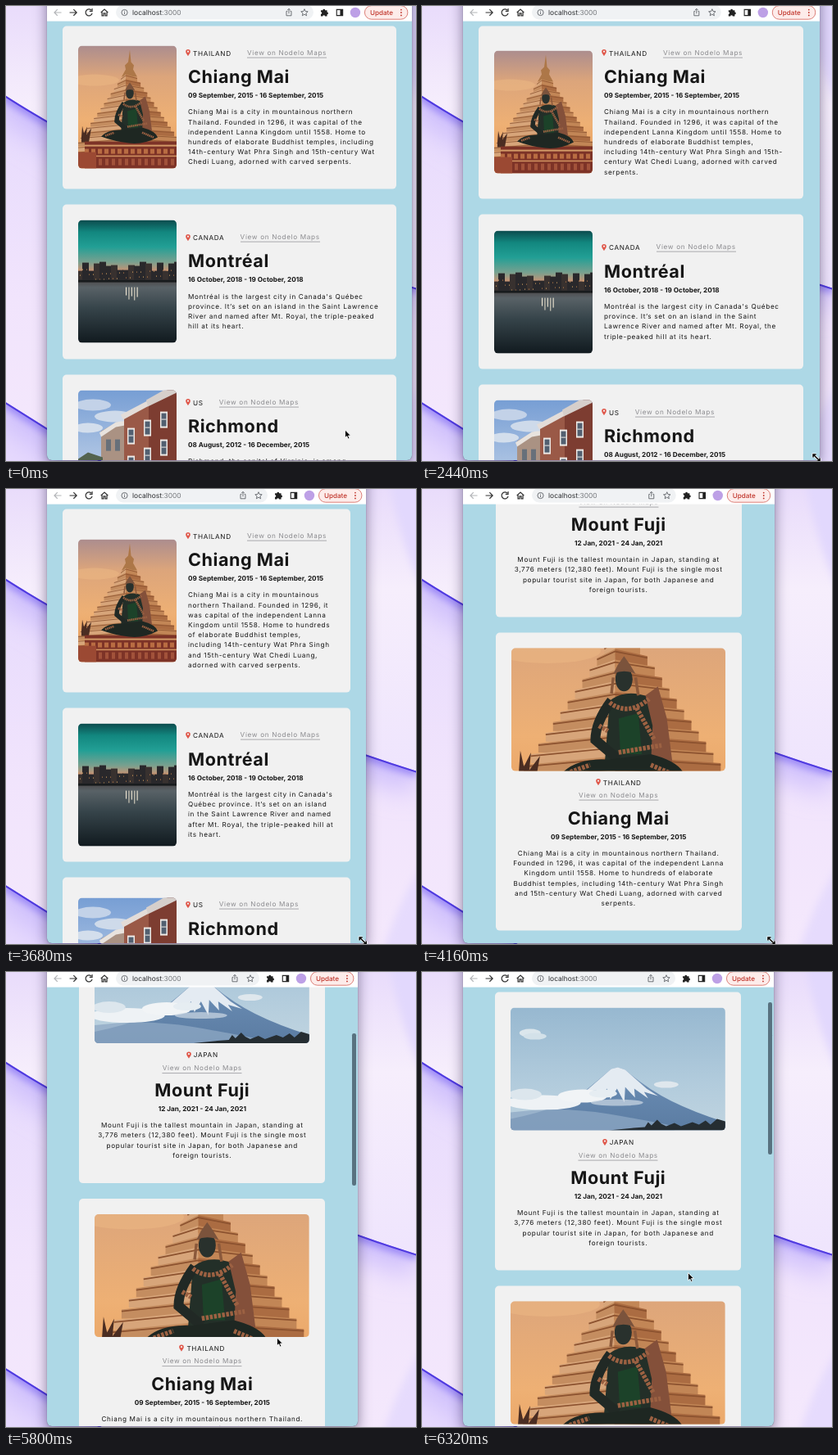
Write an HTML page that moves like this. It is 500 px wide and 556 px high and loops after 6.36 s.

```html
<!DOCTYPE html>
<html lang="en">
<head>
<meta charset="utf-8">
<title>Travel journal</title>
<style>
html, body { margin: 0; width: 100%; height: 100%; overflow: hidden; }
body { position: relative; font-family: Inter, Roboto, sans-serif; text-rendering: geometricPrecision; }
svg { display: block; }
.layer { position: absolute; left: 0; top: 0; width: 500px; height: 556px; }
#win { position: absolute; left: 49.6px; top: -30px; height: 584.8px; overflow: hidden;
  background: #add8e6; border-radius: 0 0 6px 6px;
  box-shadow: 0 6px 16px rgba(25, 15, 60, .5), 0 0 1px rgba(0, 0, 0, .6); }
#bar { position: absolute; left: -49.6px; top: 30px; width: 500px; height: 18.6px; }
#page { position: absolute; left: 0; right: 0; top: 30px; padding-top: 72px; }
.card { display: flex; align-items: center; margin: 0 19.4px 19.2px 19.2px; padding: 19.2px;
  background: #f1f1f1; border-radius: 5px; }
.card:first-child { box-sizing: border-box; height: 188.4px; overflow: hidden; }
.photo { flex: none; width: 120px; height: 150px; border-radius: 5px; }
.info { position: relative; flex: 1; margin: 0 -1.2px 0 14px; padding: 79.5px 0 8.2px;
  font-size: 8.16px; color: #161616; }
.loc { position: absolute; left: -3px; top: 8px; display: flex; line-height: 12px;
  letter-spacing: .67px; white-space: nowrap; }
.loc svg { width: 6px; height: 9px; margin: 1.5px 3px 0 0; }
.loc a { margin-left: 19.2px; line-height: 11px; color: #8b8b8f; border-bottom: 1px solid #a9a9ad; }
h2, .date { position: absolute; left: 0; right: 0; margin: 0; font-weight: 700; white-space: nowrap; }
h2 { top: 30.2px; font-size: 21.6px; line-height: 26px; letter-spacing: .55px; }
.date { top: 59.2px; line-height: 12px; }
p { margin: 0; line-height: 12.24px; letter-spacing: .67px; }
.col .card { flex-direction: column; box-sizing: border-box; width: 300px; height: auto; margin: 0 auto 19.2px; }
.col .photo { width: 261.6px; }
.col .info { flex: none; width: 261.6px; margin: 0; padding-top: 94px; text-align: center; }
.col .loc { left: 0; right: 0; justify-content: center; }
.col .loc a { position: absolute; left: 50%; top: 16.5px; margin: 0; transform: translateX(-50%); }
.col h2 { top: 44.7px; }
.col .date { top: 73.7px; }
#thumb { position: absolute; right: 2.2px; top: 50px; width: 4.4px; height: 186px; border-radius: 2.2px; background: #587280; }
</style>
</head>
<body>
<svg class="layer" id="wall" viewBox="0 0 500 556"></svg>
<div id="win">
  <div id="page"></div>
  <div id="thumb"></div>
  <svg id="bar" viewBox="0 0 500 18.6">
    <rect width="500" height="18.6" fill="#fff"/>
    <g fill="none" stroke="#333" stroke-width="1.2">
      <path d="M67.5 8H59M62.7 4.2L58.9 8l3.8 3.8" stroke="#b3b5b8"/>
      <path d="M77.5 8H86M82.3 4.2L86.1 8l-3.8 3.8"/>
      <path d="M104 5.2A4 4 0 1 0 105 8.8M105 3v3.3h-3.3"/>
      <path d="M115.7 8L120 4l4.3 4M117 7.3v4.6h2v-3h2v3h2V7.3"/>
    </g>
    <rect id="omni" x="134" y="-1" height="17.4" rx="8.7" fill="#f0f2f4"/>
    <g fill="none" stroke="#5f6368" stroke-width=".9">
      <circle cx="144.5" cy="8" r="3.6"/><path d="M144.5 7.4v2.6M144.5 5.7v.9"/>
    </g>
    <text x="154" y="11.1" font-size="8.45" fill="#2b2d30">localhost<tspan fill="#74777b">:3000</tspan></text>
    <g id="tools">
      <g fill="none" stroke="#5f6368" stroke-width=".9">
        <path d="M343.3 6.4h-1.3v5.4h6V6.4h-1.3M345 9.3V3.4M343.2 5.1L345 3.3l1.8 1.8"/>
        <path d="M364 3.7l1.2 2.8 3 .3-2.3 2 .7 3-2.6-1.6-2.6 1.6.7-3-2.3-2 3-.3z"/>
      </g>
      <path d="M384 5.2h2.4a1.4 1.4 0 1 1 2.8 0h2.4v2.3a1.4 1.4 0 1 1 0 2.8v2.3H389a1.3 1.3 0 0 0-2.6 0H384V9.9a1.3 1.3 0 0 0 0-2.6z" fill="#222"/>
      <path d="M403.3 4.4h7.4v7.2h-7.4z" fill="none" stroke="#222" stroke-width="1.1"/>
      <path d="M407.5 4.4h3.2v7.2h-3.2z" fill="#222"/>
      <circle cx="426" cy="8" r="6.2" fill="#bda0e6"/>
      <rect x="437.5" y="-.4" width="52.5" height="16.6" rx="8.3" fill="#fdecea" stroke="#d8726a" stroke-width=".9"/>
      <text x="444" y="11" font-size="8.1" font-weight="500" fill="#c0352b">Update</text>
      <g fill="#c0352b"><circle cx="482" cy="4.6" r=".9"/><circle cx="482" cy="8" r=".9"/><circle cx="482" cy="11.4" r=".9"/></g>
    </g>
  </svg>
</div>
<svg class="layer" viewBox="0 0 500 556">
  <g id="arrow"><path d="M0 0V9.6L2.2 7.6 3.7 11 5.4 10.2 3.9 7H6.9Z" fill="#000" stroke="#fff" stroke-width=".8"/></g>
  <g id="sizer">
    <path d="M-3 -3L3 3M-4 -.5V-4H-.5M4 .5V4H.5" fill="none" stroke="#fff" stroke-width="3"/>
    <path d="M-3 -3L3 3M-4 -.5V-4H-.5M4 .5V4H.5" fill="none" stroke="#000" stroke-width="1.5"/>
  </g>
  <g id="beam" fill="none">
    <path d="M-2 -4.6Q0 -4.6 0 -3.2 0 -4.6 2 -4.6M0 -3.2V3.2M-2 4.6Q0 4.6 0 3.2 0 4.6 2 4.6M-1.2 1.2H1.2" stroke="#fff" stroke-width="1.8"/>
    <path d="M-2 -4.6Q0 -4.6 0 -3.2 0 -4.6 2 -4.6M0 -3.2V3.2M-2 4.6Q0 4.6 0 3.2 0 4.6 2 4.6M-1.2 1.2H1.2" stroke="#222" stroke-width=".9"/>
  </g>
</svg>
<script>
const $ = id => document.getElementById(id);
const times = (n, f) => Array.from({ length: n }, (_, i) => f(i)).join('');
const grad = (id, ...stops) => `<linearGradient id="${id}" x2="0" y2="1">` +
  stops.map(([o, c]) => `<stop offset="${o}" stop-color="${c}"/>`).join('') + '</linearGradient>';
const box = (x, y, w, h, fill) => `<rect x="${x}" y="${y}" width="${w}" height="${h}" fill="${fill}"/>`;
const path = (d, fill, more = '') => `<path d="${d}" fill="${fill}" ${more}/>`;
const oval = (x, y, rx, ry, fill, more = '') => `<ellipse cx="${x}" cy="${y}" rx="${rx}" ry="${ry}" fill="${fill}" ${more}/>`;
const blur = (id, r) => `<filter id="${id}" filterUnits="userSpaceOnUse" x="-60" y="-60" width="620" height="680"><feGaussianBlur stdDeviation="${r}"/></filter>`;

// Wallpaper: overlapping sheets, each with a soft glow along its edge
const sheet = (id, edge, close, fill) => {
  const line = (c, w, f) => path(edge, 'none', `stroke="${c}" stroke-width="${w}" filter="url(#${f})"`);
  return `<clipPath id="${id}"><path d="${edge}${close}"/></clipPath><g clip-path="url(#${id})">` +
    path(edge + close, fill) + line('#cfc0fc', 56, 'wide') + line('#9a87f6', 13, 'mid') + line('#4f3ae0', 4, 'fine') + '</g>';
};
$('wall').innerHTML = blur('wide', 16) + blur('mid', 5) + blur('fine', .7) +
  grad('dusk', [0, '#e9dcfb'], [.22, '#f6eefc'], [.6, '#efe5fd'], [1, '#f6e9fc']) +
  grad('sheer', [0, '#e6dafd'], [.55, '#f1e4fc'], [1, '#f4e8fc']) +
  box(0, 0, 500, 556, 'url(#dusk)') +
  path('M466 -20Q478 66 520 150V-20Z', '#e2d8fd', 'filter="url(#mid)"') +
  sheet('s1', 'M-2 108.5Q60 149 200 222T502 345', 'V558H-2Z', 'url(#sheer)') +
  sheet('s2', 'M-2 483L60 522 120 558', 'H-2Z', '#e6d9fd') +
  path('M455 580Q478 500 520 440V580Z', '#e6dbfd', 'filter="url(#mid)"');

const fuji = grad('fs', [0, '#97b8d0'], [.6, '#b1cbdc'], [1, '#c0d4e0']) + grad('fm', [0, '#8ba6c4'], [.4, '#6587ae'], [1, '#5b7ca2']) +
  box(0, 0, 262, 150, 'url(#fs)') +
  oval(24, 31, 13, 5, '#dbe6ec') + oval(30, 35, 14, 4, '#d3e1e9') + oval(190, 94, 15, 4, '#dfe7ed') +
  path('M0 136Q70 122 98 96L123 75 131 73 140 76Q168 100 196 114T262 140V150H0Z', 'url(#fm)') +
  path('M92 102L123 75 131 73 140 76 166 99 180 108 163 103 168 111 151 99 152 110 140 97 139 116 130 99 122 112 118 99 106 110 107 101Z', '#e4ebf2') +
  oval(40, 116, 46, 9, '#eef2f5') + oval(88, 108, 30, 8, '#f1f4f6') + oval(113, 105, 17, 5, '#e6edf2') +
  oval(18, 106, 20, 7, '#dce6ed') + oval(130, 116, 32, 4, '#cfdbe6', 'opacity=".7"') +
  path('M0 128Q60 120 120 130T200 145V150H0Z', '#8ea9c4', 'opacity=".75"') +
  path('M120 150L150 147 164 146 168 140 172 144 179 137 184 142 190 145 200 141 208 145 222 140 230 143 238 138 244 143 252 136 262 139V150Z', '#252d32');

// The ridge of the stupa splits each tier into a lit and a shaded face
const tiers = times(17, i => {
  const y = 35 + i * 6, w = 10 + i * 4.1, a = 62 - w, b = 62 + w;
  return path(`M${a} ${y + 5}L58 ${y}V${y + 10}H${a}Z`, i % 2 ? '#c48d60' : '#d7a57a') +
    path(`M58 ${y}L${b} ${y + 4}V${y + 10}H58Z`, i % 2 ? '#ab6c42' : '#c28656') +
    path(`M${a} ${y + 6}L58 ${y + 1.4}L${b} ${y + 5}`, 'none', 'stroke="#8c522f" stroke-width=".8"');
});
const temple = grad('ts', [0, '#ac8d8e'], [.25, '#dca57b'], [.6, '#eeb074'], [1, '#e59a58']) +
  box(0, 0, 120, 150, 'url(#ts)') + oval(20, 42, 30, 7, '#f0bd88', 'opacity=".4"') +
  path('M63 5L64.5 20 68 24 67 29 72 38H53L58 29 57 24 61 20Z', '#ad7748') + tiers +
  path('M4 112L5 98 7 107 11 99 10 109 16 101 13 118H4Z', '#4b2d22') +
  box(8, 117, 112, 33, '#7d3327') +
  times(14, i => box(8 + i * 8, 126, 5, 6, '#b96c42') + box(9 + i * 8, 138, 4, 8, '#a2523a')) +
  box(8, 121, 112, 2, '#d39a68') + box(8, 134, 112, 1.6, '#cf9060') + box(0, 130, 22, 20, '#9b4933') +
  path('M55 70Q64 63 77 68L84 84 80 108H52Z', '#232f28') + path('M60 80L71 77 73 100H61Z', '#1c4229') +
  path('M75 67L82 62 87 80 90 104 78 106 79 84Z', '#84503a') +
  path('M56 70Q47 82 47 92L60 103', 'none', 'stroke="#212925" stroke-width="5.5"') +
  path('M28 111Q36 102 54 103L78 100Q94 104 97 112 80 121 62 119T28 111Z', '#1e2722') +
  path('M55 71Q65 79 77 69M49 84L54 87M60 99L84 95M70 74L80 92M33 110L44 106M78 106L92 112', 'none', 'stroke="#9c6142" stroke-width="2.6" stroke-dasharray="1.6 .7"') +
  oval(63, 58, 4.8, 6.8, '#29312d') + path('M57 55L59.5 50 63 45 66.5 50 69.5 55Q63 52 57 55Z', '#7b533c') +
  path('M57 57L56 66M69.5 57L71 67', 'none', 'stroke="#8b593b" stroke-width="1.6"');

const roofs = times(18, i => {
  const h = 9 + (i * 7 + i * i * 3) % 13;
  return box(i * 7 - 2, 71 - h, 8, h + 3, i % 3 ? '#29282b' : '#38312f');
});
const river = grad('ms', [0, '#0c4b4d'], [.2, '#12877f'], [.45, '#229f95'], [.7, '#78a08f'], [.88, '#d8906d'], [1, '#b9715a']) +
  grad('mw', [0, '#4b4748'], [.12, '#596267'], [.45, '#36444a'], [1, '#111a1f']) +
  box(0, 0, 120, 73, 'url(#ms)') + roofs + box(0, 73, 120, 77, 'url(#mw)') +
  times(34, i => box((i * 37) % 119, 60 + (i * 11) % 13, 1, 1, i % 2 ? '#e9b266' : '#c9854c')) +
  box(0, 73, 120, 3, '#181b1d') +
  times(5, i => box(58 + i * 3.4, 82, 1.1, 10 + i * 5 % 9, i % 2 ? '#d8d1c0' : '#f1e8d4'));

const street = grad('rs', [0, '#779ed4'], [.5, '#a9c1e2'], [1, '#d2dbe8']) + box(0, 0, 120, 150, 'url(#rs)') +
  oval(18, 18, 22, 7, '#c3d2e8') + oval(45, 32, 25, 7, '#cedaea') + oval(12, 46, 18, 6, '#d3deec') +
  path('M28 150V50L46 40 66 38V150Z', '#aa9283') + path('M26 52L46 39 68 36V41L46 45 28 57Z', '#e8e3de') +
  path('M56 150V30L88 14V150Z', '#9a5947') + path('M52 30L90 10V17L55 36Z', '#e3dcd8') +
  path('M86 150V11L120 -6V150Z', '#7d3d31') + path('M83 12L120 -9V3L85 20Z', '#d6cfcb') +
  times(9, i => {
    const x = 60 + (i % 3) * 20, y = 46 - (i % 3) * 10 + (i / 3 | 0) * 34;
    return box(x, y, 9, 20, '#eee9e5') + box(x + 1.5, y + 2, 6, 16, '#526071') + box(x + 1.5, y + 9, 6, 1, '#eee9e5');
  }) +
  times(4, i => box(34 + i % 2 * 11, 60 + (i / 2 | 0) * 26, 6, 14, '#67707a')) +
  path('M0 150V84L12 76 30 82V150Z', '#54634e');

const places = [
  ['JAPAN', 'Mount Fuji', '12 Jan, 2021 - 24 Jan, 2021', fuji, 262,
    'Mount Fuji is the tallest mountain in Japan, standing at 3,776 meters (12,380 feet). Mount Fuji is the single most popular tourist site in Japan, for both Japanese and foreign tourists.'],
  ['THAILAND', 'Chiang Mai', '09 September, 2015 - 16 September, 2015', temple, 120,
    'Chiang Mai is a city in mountainous northern Thailand. Founded in 1296, it was capital of the independent Lanna Kingdom until 1558. Home to hundreds of elaborate Buddhist temples, including 14th-century Wat Phra Singh and 15th-century Wat Chedi Luang, adorned with carved serpents.'],
  ['CANADA', 'Montréal', '16 October, 2018 - 19 October, 2018', river, 120,
    'Montréal is the largest city in Canada\'s Québec province. It’s set on an island in the Saint Lawrence River and named after Mt. Royal, the triple-peaked hill at its heart.'],
  ['US', 'Richmond', '08 August, 2012 - 16 December, 2015', street, 120,
    'Richmond, the capital of Virginia, is among America\'s oldest major cities. Its revolutionary past is preserved in churches, brick row houses and museums along the James River, with trails and parks linking the old districts.']
];
const pin = '<svg viewBox="0 0 6 9"><path fill="#e0574a" fill-rule="evenodd" d="M3 .3A2.8 2.8 0 0 0 .2 3.1C.2 5 3 8.4 3 8.4S5.8 5 5.8 3.1A2.8 2.8 0 0 0 3 .3ZM3 2A1.1 1.1 0 1 1 3 4.2 1.1 1.1 0 0 1 3 2Z"/></svg>';
$('page').innerHTML = places.map(([land, name, date, art, w, text]) => `<div class="card">
  <svg class="photo" viewBox="0 0 ${w} 150" preserveAspectRatio="xMidYMid slice">${art}</svg>
  <div class="info"><div class="loc">${pin}<span>${land}</span><a>View on Nodelo Maps</a></div>
  <h2>${name}</h2><div class="date">${date}</div><p>${text}</p></div></div>`).join('');

// Linear interpolation through [time, value] points
function at(keys, t) {
  if (t <= keys[0][0]) return keys[0][1];
  for (let i = 1; i < keys.length; i++) {
    const [a, u] = keys[i - 1], [b, v] = keys[i];
    if (t <= b) return u + (v - u) * (t - a) / (b - a);
  }
  return keys[keys.length - 1][1];
}
const LOOP = 6360, STEP = 40;
const right = [[1720, 495], [2040, 487], [2360, 487], [2920, 472], [3680, 439], [4200, 429]];
const scroll = [[5440, 255.4], [5800, 153.9], [6080, 88], [6320, 47.4]];
const curX = [[0, 413.5], [640, 452], [1280, 491], [4600, 425.5], [5160, 330.5], [5840, 330.5], [6320, 324.5]];
const curY = [[0, 518], [640, 537], [1280, 552], [4600, 552], [5160, 447], [5840, 447], [6320, 367.5]];

function draw(t) {
  const r = at(right, t), s = at(scroll, t);
  $('win').style.width = r - 49.6 + 'px';
  $('page').className = r < 434 ? 'col' : '';
  $('page').style.transform = `translateY(${-s}px)`;
  $('omni').setAttribute('width', r - 254);
  $('tools').setAttribute('transform', `translate(${r - 495} 0)`);
  $('thumb').style.display = t > 5440 ? '' : 'none';
  $('thumb').style.transform = `translateY(${s * .357}px)`;

  const sizing = t >= 1280 && t < 4600;
  const mode = sizing ? 'sizer' : t >= 5120 && t <= 5480 ? 'beam' : 'arrow';
  const x = sizing ? r - 3.8 : at(curX, t), y = sizing ? 552 : at(curY, t);
  for (const id of ['arrow', 'sizer', 'beam']) $(id).style.display = id === mode ? '' : 'none';
  $(mode).setAttribute('transform', `translate(${x} ${y})`);
}

const start = performance.now();
function tick() {
  const t = (performance.now() - start) % LOOP;
  draw(Math.floor(t / STEP) * STEP);
  requestAnimationFrame(tick);
}
tick();
</script>
</body>
</html>
```
